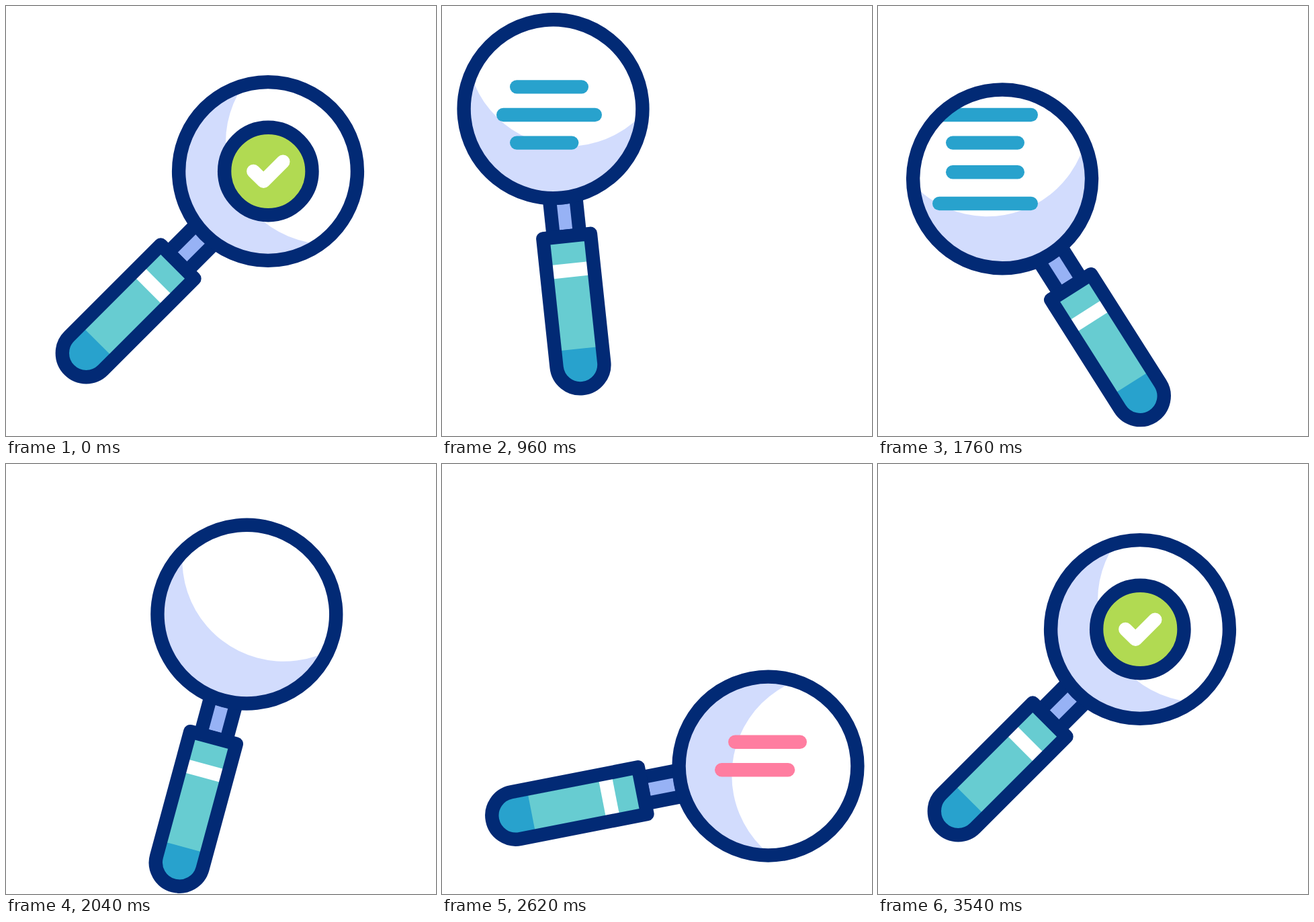
Recreate the animation shown at these times as an HTML page. Size 640 by 640 pixels, loop 3600 ms.

```html
<!DOCTYPE html>
<html lang="en">
<head>
<meta charset="utf-8">
<title>Magnifying glass</title>
<style>
  html, body { margin: 0; width: 100%; height: 100%; overflow: hidden; background: #fff; }
  svg { display: block; width: 100vw; height: 100vh; }
</style>
</head>
<body>
<svg viewBox="0 0 640 640">
  <defs>
    <clipPath id="lensClip"><circle id="hole" r="125"/></clipPath>
    <clipPath id="gripClip"><path d="M-26 199H26V382.8A26 26 0 0 1 -26 382.8Z"/></clipPath>
  </defs>
  <g clip-path="url(#lensClip)">
    <g id="glass">
      <circle r="126" fill="#d2dcfd"/>
      <circle cx="32" cy="-92.4" r="151" fill="#fff"/>
    </g>
    <g id="bars" fill="none" stroke-width="20.4" stroke-linecap="round"/>
    <g id="badge">
      <circle cx="390.3" cy="246" r="65.2" fill="#b1da52" stroke="#022a75" stroke-width="20.4"/>
      <path d="M368.3 246L383.3 260.7L412.3 231.8" fill="none" stroke="#fff" stroke-width="20.4" stroke-linecap="round" stroke-linejoin="round"/>
    </g>
  </g>
  <g id="frame">
    <path d="M-29.9 130H29.9V195H-29.9Z" fill="#022a75"/>
    <path d="M-9.6 142.6H9.6V180.4H-9.6Z" fill="#97b2f5"/>
    <circle r="132.9" fill="none" stroke="#022a75" stroke-width="20.4"/>
    <g clip-path="url(#gripClip)">
      <path d="M-30 195H30V420H-30Z" fill="#67ccd1"/>
      <path d="M-30 231.2H30V251.7H-30Z" fill="#fff"/>
      <path d="M-30 359H30V420H-30Z" fill="#28a2cd"/>
    </g>
    <path d="M-35.5 190.4H35.5V382.8A35.5 35.5 0 0 1 -35.5 382.8Z" fill="none" stroke="#022a75" stroke-width="20.4" stroke-linejoin="round"/>
  </g>
</svg>
<script>
const LOOP = 3600, GROW = 152;
const $ = id => document.getElementById(id);

const bezier = (a, b, c, d, u) => {
  const v = 1 - u;
  return v * v * v * a + 3 * u * v * v * b + 3 * u * u * v * c + u * u * u * d;
};

// Eases in and out; larger x1 starts slower, smaller x2 ends slower.
const ease = (x1, x2) => p => {
  let lo = 0, hi = 1;
  for (let i = 0; i < 24; i++) {
    const mid = (lo + hi) / 2;
    if (bezier(0, x1, x2, 1, mid) < p) lo = mid; else hi = mid;
  }
  return bezier(0, 0, 1, 1, lo);
};
const glide = ease(0.33, 0), swing = ease(0.14, 0.57), settle = ease(0.62, 0.41);

// Resting places of the lens
const badgeStop = { x: 390, y: 246, angle: 45 };
const topStop = { x: 165.5, y: 153, angle: -6 };
const leftStop = { x: 175.5, y: 266, angle: -35 };
const rightStop = { x: 485.5, y: 450, angle: 79 };

// Each leg follows a curve with two control points.
const legs = [
  { start: 240, end: 940, from: badgeStop, c1: [315, 172], c2: [253.5, 150], to: topStop, pace: glide },
  { start: 940, end: 1400, from: topStop, c1: [165, 190], c2: [169, 212.5], to: leftStop, pace: settle },
  { start: 1720, end: 2640, from: leftStop, c1: [315, 134], c2: [479, 255.6], to: rightStop, pace: swing },
  { start: 2780, end: 3405, from: rightStop, c1: [468.5, 374], c2: [436.7, 306], to: badgeStop, pace: settle }
];

function poseAt(t) {
  const leg = legs.filter(l => l.start <= t).pop();
  if (!leg) return badgeStop;
  if (t >= leg.end) return leg.to;
  const { from, c1, c2, to } = leg;
  const u = leg.pace((t - leg.start) / (leg.end - leg.start));
  return {
    x: bezier(from.x, c1[0], c2[0], to.x, u),
    y: bezier(from.y, c1[1], c2[1], to.y, u),
    angle: from.angle + (to.angle - from.angle) * u
  };
}

// Rows grow one after another; every second row is wide.
const groups = [
  { x: 111.2, y: 120.4, rows: 3, gap: 41.6, start: 528, colour: '#28a2cd' },
  { x: 111.2, y: 247.2, rows: 2, gap: 46.8, start: 984, colour: '#28a2cd' },
  { x: 436.2, y: 413.7, rows: 3, gap: 41.6, start: 2359, colour: '#ff7da0' }
];
const bars = groups.flatMap(g => Array.from({ length: g.rows }, (_, i) => {
  const el = document.createElementNS('http://www.w3.org/2000/svg', 'path');
  el.setAttribute('stroke', g.colour);
  $('bars').appendChild(el);
  const wide = i % 2 * 20;
  return { el, start: g.start + i * GROW, x: g.x - wide, y: g.y + i * g.gap, width: 96.6 + 2 * wide };
}));

function draw(t) {
  const { x, y, angle } = poseAt(t);
  const place = `translate(${x} ${y}) rotate(${angle})`;
  $('glass').setAttribute('transform', place);
  $('frame').setAttribute('transform', place);
  $('hole').setAttribute('cx', x);
  $('hole').setAttribute('cy', y);
  $('badge').style.display = t < 1500 || t > 2700 ? '' : 'none';
  for (const b of bars) {
    const p = Math.min(1, (t - b.start) / GROW);
    b.el.style.display = p > 0 ? '' : 'none';
    if (p > 0) b.el.setAttribute('d', `M${b.x} ${b.y}h${b.width * p}`);
  }
}

const begin = performance.now();
function tick() {
  draw((performance.now() - begin) % LOOP);
  requestAnimationFrame(tick);
}
draw(0);
requestAnimationFrame(tick);
</script>
</body>
</html>
```
